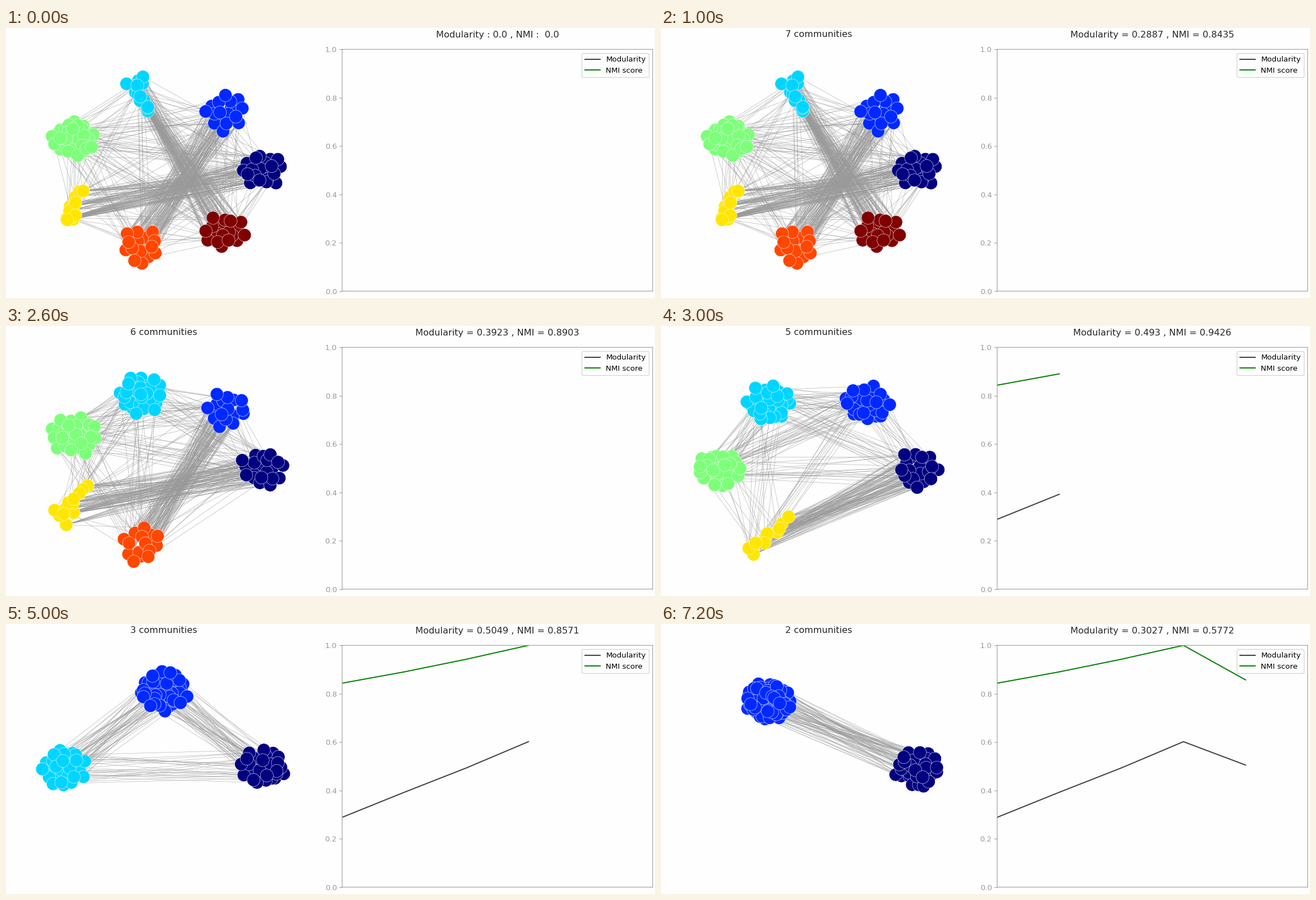
These frames come from a looping animation (1159x483 px, 8000 ms). A matplotlib script:

```python
import numpy as np
import matplotlib.pyplot as plt
from matplotlib.animation import FuncAnimation
from matplotlib.collections import LineCollection

W, H, DPI = 1159, 483, 96
K = 1.006                       # overall size factor for text and nodes
GREY, PAPER = "#999999", "#fefefe"
HUB, ORBIT = np.array([281, 256.5]), np.array([177, 137])
MIX, SPLIT = 0.025, 0.44        # link odds between groups / inside a divided one
GOLDEN = np.pi * (3 - 5 ** 0.5)

plt.rcParams["font.family"] = "DejaVu Sans"
rng = np.random.default_rng(7)
palette = plt.get_cmap("jet")(np.linspace(0, 1, 7))

group_sizes = [
    [20, 17, 14, 32, 12, 15, 18],
    [20, 17, 32, 32, 12, 15],
    [20, 32, 32, 32, 12],
    [32, 32, 32, 32],
    [32, 64, 32],
    [32, 96],
]
modularity = [0.2887, 0.3923, 0.493, 0.6016, 0.5049, 0.3027]
nmi = [0.8435, 0.8903, 0.9426, 1.0, 0.8571, 0.5772]


def disc(n):
    """Sunflower spread in an ellipse, loosened a little."""
    i = np.arange(n)
    r = np.sqrt((i + 0.5) / n)
    a = i * GOLDEN + rng.uniform(0, 2 * np.pi)
    reach = min(34 + n / 5, 41)
    return np.column_stack([reach * r * np.cos(a), 33 * r * np.sin(a)])


def streak(n, dx, dy):
    """Chain that thickens towards its (dx, dy) end."""
    t = 1 - 2 * np.linspace(0, 1, n) ** 1.5
    side = 17 * (1 + t) / 2 * rng.uniform(-1, 1, n)
    length = np.hypot(dx, dy)
    return np.outer(t, [dx, dy]) + np.outer(side, [-dy / length, dx / length])


def group(k, n, count):
    """Nodes of group k, placed on the ring of groups."""
    turn = 2 * np.pi * k / min(count + 1, 7)
    arm = ORBIT * [np.cos(turn), -np.sin(turn)]
    if n < 15:
        spots = streak(n, -12 * (8 - count), 28 * np.sign(arm[1]))
    else:
        spots = disc(n)
    return rng.permutation(HUB + arm + spots + rng.normal(0, 2.5, (n, 2)))


def links(groups):
    """Random links between every two groups, dense where one was divided."""
    out = []
    for j, b in enumerate(groups):
        for i, a in enumerate(groups[:j]):
            divided = j == i + 4 and len(a) + len(b) <= 32
            total = len(a) * len(b)
            number = round((SPLIT if divided else MIX) * total)
            pick = rng.choice(total, number, replace=False)
            out.append(np.stack([a[pick // len(b)], b[pick % len(b)]], axis=1))
    return np.concatenate(out)


def layout(sizes):
    groups = [group(k, n, len(sizes)) for k, n in enumerate(sizes)]
    hues = np.repeat(palette[:len(sizes)], sizes, axis=0)
    return np.vstack(groups), hues, links(groups)


layouts = [layout(sizes) for sizes in group_sizes]

fig = plt.figure(figsize=(W / DPI, H / DPI), dpi=DPI, facecolor=PAPER)

net = fig.add_axes([0, 0, 1, 1])
net.set(xlim=(0, W), ylim=(H, 0))
net.axis("off")
lines = LineCollection([], colors=GREY, linewidths=0.36, zorder=1)
net.add_collection(lines)
nodes = net.scatter([], [], s=300 * K * K, edgecolors="white", linewidths=0.4, zorder=2)

heading = dict(fontsize=12 * K, color="#262626", ha="center", va="baseline")
left_title = net.text(281.3, 16.5, "", **heading)
right_title = net.text(877.6, 16.5, "", **heading)

left, right, top, bottom = 600.3, 1154.8, 38.2, 470.7
chart = fig.add_axes([left / W, 1 - bottom / H, (right - left) / W, (bottom - top) / H],
                     facecolor=PAPER)
chart.set(xlim=(0, 5), ylim=(0, 1), xticks=[])
chart.tick_params(axis="y", colors=GREY, labelsize=10 * K)
for spine in chart.spines.values():
    spine.set_color(GREY)
    spine.set_snap(False)
mod_line, = chart.plot([], [], color="#404040", lw=1.5, label="Modularity")
nmi_line, = chart.plot([], [], color="green", lw=1.5, label="NMI score")
chart.legend(loc="upper right", fontsize=10 * K)


def draw(i):
    step = min(i, 6)
    k = max(step - 1, 0)
    spots, hues, segments = layouts[k]
    nodes.set_offsets(spots)
    nodes.set_facecolor(hues)
    lines.set_segments(segments)
    if step:
        left_title.set_text(f"{7 - k} communities")
        right_title.set_text(f"Modularity = {modularity[k]} , NMI = {nmi[k]}")
    else:
        left_title.set_text("")
        right_title.set_text("Modularity : 0.0 , NMI :  0.0")
    mod_line.set_data(range(k), modularity[:k])
    nmi_line.set_data(range(k), nmi[:k])
    return nodes, lines, left_title, right_title, mod_line, nmi_line


anim = FuncAnimation(fig, draw, frames=8, interval=1000, init_func=lambda: draw(0),
                     repeat=True, repeat_delay=0, blit=False)
plt.show()
```
